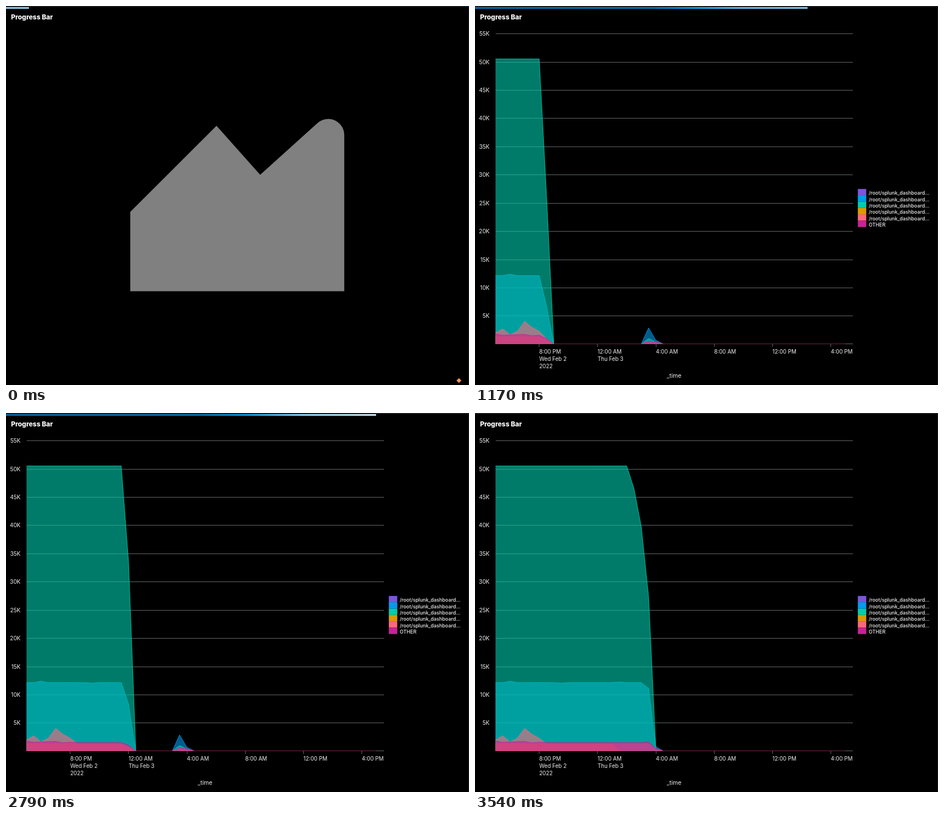
These frames come from a looping animation (827 by 677 pixels, 4130 ms). An HTML page with a canvas:

```html
<!DOCTYPE html>
<html lang="en">
<head>
<meta charset="utf-8">
<title>Progress Bar</title>
<style>
  html, body { margin: 0; width: 100%; height: 100%; overflow: hidden; background: #000; }
  canvas { display: block; width: 827px; height: 677px; }
</style>
</head>
<body>
<canvas id="stage" width="827" height="677"></canvas>
<script>
const ctx = document.getElementById('stage').getContext('2d');
const LOOP = 4130;
const FONT = 'Inter, "Open Sans", sans-serif';
const BASE = 603.7;
const COLORS = {
  purple: '#7b56db', blue: '#009ceb', teal: '#00cdaf',
  yellow: '#dd9900', salmon: '#ff677b', magenta: '#cb2196'
};

// Bar glow: [start time, strength]
const GLOW = [
  [0, .65], [150, .4], [300, .3], [440, .5], [590, .85], [880, .6], [1030, .3],
  [1170, .6], [1320, .75], [1470, .9], [1760, .95], [1910, .95],
  [2940, .65], [3090, .5], [3240, .4], [3390, .6]
];

// Steady level of each series, as a y position at sample i
const SALMON = [584, 577, 587.5, 581, 563.5, 574, 581];
const MAGENTA = [586, 588, 587.5, 587, 586.5, 589, 588];
const LEVEL = {
  blue: i => i === 2 ? 479 : i === 9 ? 482.5 : i === 17 ? 480.5 : 481.5,
  teal: () => 94.5,
  yellow: () => 591,
  salmon: i => SALMON[i] ?? 591,
  magenta: i => MAGENTA[i] ?? 588.5
};

// A later burst, starting at sample 20
const BURST = {
  blue: [BASE, 575, 597, BASE],
  teal: [BASE, 594, 600, BASE],
  salmon: [BASE, 599, 602, BASE],
  magenta: [BASE, 598.5, 599.5, BASE]
};

// Per series: last steady sample, then the falling tail
const STAGES = [
  { from: 1170, burst: true, runs: {
    blue: [6, 536, BASE], teal: [6, 338, BASE], yellow: [6, 597, BASE],
    salmon: [6, 595, BASE], magenta: [6, 594, BASE] } },
  { from: 1910, burst: true, runs: {
    blue: [13, 520, BASE], teal: [13, 265, BASE], yellow: [13, 597, BASE],
    salmon: [13, 596, BASE], magenta: [13, 593, BASE] } },
  { from: 2940, burst: false, runs: {
    blue: [20, 492, 596, BASE], teal: [18, 135, 203, 327, 600, BASE],
    yellow: [16, BASE], salmon: [20, 591, 601, BASE],
    magenta: [20, 587, 599, BASE] } }
];

const px = i => 36.6 + 13.02 * i;

function rect(color, x, y, w, h) {
  ctx.fillStyle = color;
  ctx.fillRect(x, y, w, h);
}

function text(str, x, y, size, align = 'left', weight = 400, color = '#f0f0f0') {
  ctx.font = `${weight} ${size}px ${FONT}`;
  ctx.textAlign = align;
  ctx.fillStyle = color;
  ctx.fillText(str, x, y);
}

function area(color, start, ys) {
  const line = new Path2D();
  ys.forEach((y, k) => line.lineTo(px(start + k), y));
  const fill = new Path2D(line);
  fill.lineTo(px(start + ys.length - 1), 604);
  fill.lineTo(px(start), 604);
  ctx.fillStyle = color;
  ctx.globalAlpha = .6;
  ctx.fill(fill);
  ctx.globalAlpha = 1;
  ctx.strokeStyle = color;
  ctx.lineWidth = .8;
  ctx.stroke(line);
}

function drawSeries(stage) {
  for (const name in stage.runs) {
    const [last, ...tail] = stage.runs[name];
    const steady = Array.from({ length: last + 1 }, (_, i) => LEVEL[name](i));
    area(COLORS[name], 0, steady.concat(tail));
    if (stage.burst && BURST[name]) area(COLORS[name], 20, BURST[name]);
  }
}

function drawAxes() {
  for (let k = 1; k <= 11; k++) {
    const y = Math.floor(604.28 - 50.42 * k);
    rect('#626466', 37, y, 638, 1);
    text(`${k * 5}K`, 26, y + 4.3, 9.9, 'right');
  }
  rect('#626466', 37, 603, 638, 1);
  rect('#702542', 37, 603, 624, 1);
  ['8:00 PM', '12:00 AM', '4:00 AM', '8:00 AM', '12:00 PM', '4:00 PM'].forEach((label, i) => {
    const x = px(6 + 8 * i);
    rect('#626466', Math.floor(x), 604, 1, 5);
    text(label, x, 621, 9.7);
  });
  text('Wed Feb 2', 114.7, 634, 9.7);
  text('2022', 114.7, 647, 9.7);
  text('Thu Feb 3', 219, 634, 9.7);
  text('_time', 355.5, 664, 10.5, 'center');
}

function drawLegend() {
  Object.values(COLORS).forEach((color, i) => {
    const y = 326.8 + 11.33 * i;
    rect(color, 683.8, y, 15, 11.33);
    text(i < 5 ? '/root/splunk_dashboard...' : 'OTHER', 703.3, y + 10.6, 8.8, 'left', 500);
  });
}

function drawPlaceholder() {
  ctx.fillStyle = '#808080';
  ctx.beginPath();
  ctx.moveTo(222, 509.5);
  ctx.lineTo(222, 367.8);
  ctx.lineTo(376, 214);
  ctx.lineTo(454, 301.5);
  ctx.arc(575.5, 230.5, 28.7, Math.PI + .837, 2 * Math.PI);
  ctx.lineTo(604.2, 509.5);
  ctx.fill();
  ctx.fillStyle = '#f8935f';
  ctx.beginPath();
  ctx.moveTo(809, 664.7);
  ctx.lineTo(813.4, 669);
  ctx.lineTo(809, 673.3);
  ctx.lineTo(804.6, 669);
  ctx.fill();
}

function drawBar(t) {
  if (t >= 3540) return;
  const width = t < 1170 ? 41 : t < 1320 ? 594 : 661;
  const glow = GLOW.findLast(g => t >= g[0])[1];
  const mix = (a, b) => Math.round(a + (b - a) * glow);
  const tip = `rgb(${mix(13, 217)},${mix(134, 240)},${mix(204, 252)})`;
  if (width === 41) return rect(tip, 0, 2, width, 3);
  const grad = ctx.createLinearGradient(0, 0, width, 0);
  grad.addColorStop(0, '#0069ab');
  grad.addColorStop(.53, '#0072b6');
  grad.addColorStop(.65, '#009ceb');
  grad.addColorStop(.8, `rgb(${mix(10, 150)},${mix(140, 218)},${mix(215, 248)})`);
  grad.addColorStop(1, tip);
  rect(grad, 0, 2, width, 3);
}

function draw(t) {
  rect('#000', 0, 0, 827, 677);
  rect('#1a1c1e', 0, 0, 827, 2);
  rect('#1a1c1e', 826, 0, 1, 677);
  const stage = STAGES.findLast(s => t >= s.from);
  if (stage) {
    drawAxes();
    drawSeries(stage);
    drawLegend();
  } else {
    drawPlaceholder();
  }
  drawBar(t);
  text('Progress Bar', 9, 23.5, 11.8, 'left', 800, '#fff');
}

const begin = performance.now();
function tick() {
  draw((performance.now() - begin) % LOOP);
  requestAnimationFrame(tick);
}
tick();
</script>
</body>
</html>
```
